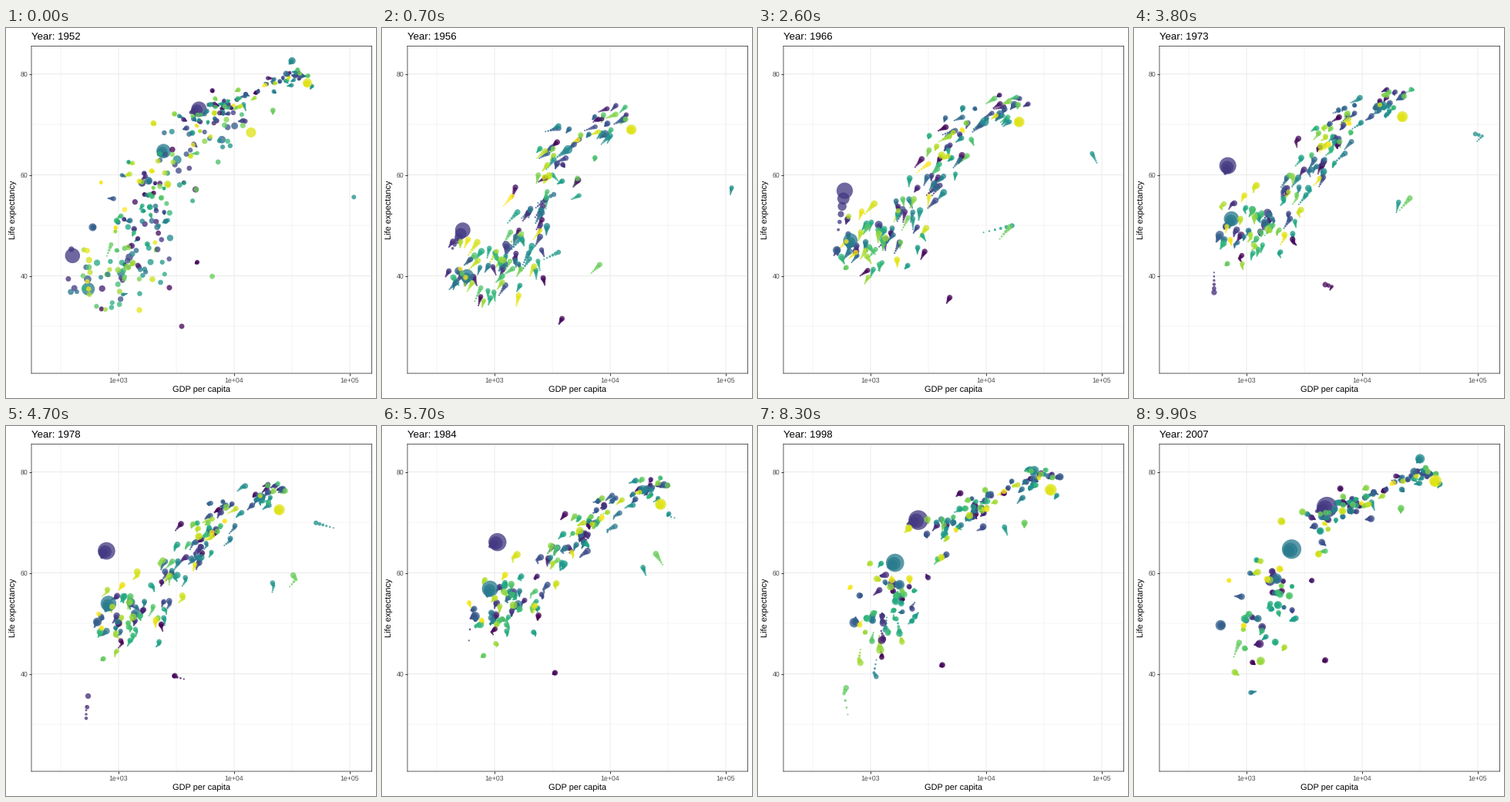
These frames come from a looping animation (480x480 px, 10000 ms). A matplotlib script:

```python
import numpy as np
import matplotlib.pyplot as plt
from matplotlib.animation import FuncAnimation

plt.rcParams["font.family"] = "Liberation Sans"
plt.rcParams["text.hinting"] = "none"

FRAMES, WAKE, COUNT = 100, 6, 142
YEARS = np.linspace(1952, 2007, FRAMES)
KNOTS = np.arange(1952, 2008, 5)
rng = np.random.default_rng(11)

pos = np.zeros((FRAMES, COUNT, 2))   # log10 GDP, life expectancy
pop = np.zeros((FRAMES, COUNT))      # millions
free = list(rng.permutation(COUNT))  # colour ranks not yet taken


def grow(start, end):
    return start * (end / start) ** ((YEARS - 1952) / 55)


def smooth(t):
    t = np.clip(t, 0, 1)
    return t * t * (3 - 2 * t)


def track(rank, pop0, pop1, *corners):
    """Lead one dot through a few (year, gdp, life) corners."""
    year, gdp, life = np.array(corners, float).T
    pos[:, rank, 0] = np.interp(YEARS, year, np.log10(gdp))
    pos[:, rank, 1] = np.interp(YEARS, year, life)
    pop[:, rank] = grow(pop0, pop1)
    free.remove(rank)


def crowd(n, gdp, life, gdp_sd, life_sd, corr, growth, dip=0):
    """Scatter n dots round a rising regional path, bending every 5 years."""
    s = np.linspace(0, 1, len(KNOTS))
    rise = 1 - (1 - s) ** 1.6
    fall = smooth((KNOTS - 1987) / 15)
    for _ in range(n):
        i = free.pop()
        a, b, c, d = np.clip(rng.normal(size=4), -2, 2)
        zg = a + 0.6 * (b - a) * s
        zl = corr * zg + np.sqrt(1 - corr ** 2) * (c + 0.5 * (d - c) * s)
        x = gdp[0] + (gdp[1] - gdp[0]) * rise + zg * gdp_sd
        y = life[0] + (life[1] - life[0]) * rise
        y += zl * (life_sd[0] + (life_sd[1] - life_sd[0]) * s)
        y -= dip * rng.random() ** 2 * fall
        x += rng.normal(0, 0.035, len(s))
        y += rng.normal(0, 0.3, len(s))
        pos[:, i, 0] = np.interp(YEARS, KNOTS, x)
        pos[:, i, 1] = np.interp(YEARS, KNOTS, y)
        start = np.clip(rng.lognormal(1.4, 1.2), 0.1, 50)
        pop[:, i] = grow(start, start * growth)


# giants
track(24, 556, 1319, (1952, 400, 44), (1957, 576, 50.5), (1962, 488, 44.5),
      (1967, 613, 58.4), (1977, 741, 64), (1992, 1656, 68.7),
      (2007, 4959, 73))
track(58, 372, 1110, (1952, 547, 37.4), (1972, 724, 50.7),
      (1987, 977, 58.6), (2007, 2452, 64.7))
track(134, 158, 301, (1952, 13990, 68.4), (1972, 21806, 71.3),
      (2007, 42952, 78.2))
track(66, 86, 127, (1952, 3217, 63), (1972, 14779, 73.4),
      (2007, 31656, 82.6))

# paths that leave the crowd
track(71, 0.2, 2.5, (1952, 108382, 55.6), (1957, 113523, 58),
      (1967, 80895, 64.6), (1972, 109348, 67.7), (1982, 31354, 71.3),
      (2007, 47307, 77.6))
track(107, 2.5, 8.9, (1952, 493, 40), (1987, 848, 44), (1992, 737, 23.6),
      (1997, 590, 36.1), (2007, 863, 46.2))
track(18, 4.7, 14, (1952, 368, 39.4), (1967, 523, 45.4), (1977, 525, 31.2),
      (1982, 624, 51), (2007, 1714, 59.7))
track(109, 4, 27.6, (1952, 6460, 39.9), (1962, 11626, 45.9),
      (1977, 34168, 58.7), (1987, 21198, 66.3), (2007, 21655, 72.8))
track(75, 1, 6, (1952, 2388, 42.7), (1962, 6757, 47.8), (1967, 18773, 50.2),
      (1977, 21951, 57.4), (2007, 12057, 74))
track(3, 4.2, 12.4, (1952, 3521, 30), (1972, 5473, 37.9),
      (1977, 3009, 39.5), (2007, 4797, 42.7))

# everyone else: Africa, Latin America, West, East, Asia, fast growers
crowd(48, (2.96, 3.15), (39.5, 57.5), 0.26, (4, 5), 0.3, 3.5, dip=17)
crowd(25, (3.45, 3.88), (53, 73.3), 0.2, (7.5, 3), 0.6, 2.6)
crowd(19, (3.88, 4.48), (68.5, 79.5), 0.11, (2.5, 1), 0.4, 1.3)
crowd(14, (3.55, 4.05), (63, 74), 0.17, (4, 1.6), 0.5, 1.3)
crowd(18, (3.05, 3.6), (43, 70), 0.27, (5.5, 4.5), 0.3, 3)
crowd(len(free), (3.35, 4.4), (57, 78), 0.2, (6, 1.8), 0.5, 2.6)

size = 2 + 10 * np.sqrt(np.clip(pop / 1319, 0, 1))

# plot frame, 72 dpi so that one point is one pixel
fig = plt.figure(figsize=(480 / 72, 480 / 72), dpi=72, facecolor="white")
ax = fig.add_axes([33 / 480, 32 / 480, 441.5 / 480, 424.5 / 480])
ax.set(xlim=(2.2467, 5.19), ylim=(20.69, 85.5))
ax.set_axisbelow(True)
ax.set_xticks([3, 4, 5], ["1e+03", "1e+04", "1e+05"])
ax.set_xticks([2.5, 3.5, 4.5], minor=True)
ax.set_yticks([40, 60, 80])
ax.set_yticks([30, 50, 70], minor=True)
ax.grid(which="major", color="#ebebeb", lw=1.07, snap=False)
ax.grid(which="minor", color="#ebebeb", lw=0.53, snap=False)
ax.tick_params(which="minor", length=0)
ax.tick_params(length=2.75, width=1, pad=2.2, color="#333333",
               labelcolor="#4d4d4d", labelsize=8.8)
for spine in ax.spines.values():
    spine.set(color="#333333", linewidth=0.8, snap=False)
fig.text(254 / 480, 7 / 480, "GDP per capita", size=11, ha="center",
         va="baseline")
fig.text(15.5 / 480, 244 / 480, "Life expectancy", size=11, rotation=90,
         ha="right", va="center")
title = fig.text(33 / 480, 465 / 480, "", size=13.2, va="baseline")

ages = np.arange(WAKE)[::-1]
falloff = (1 - ages / 10) ** 3
colors = plt.get_cmap("viridis")(np.linspace(0, 1, COUNT))
n = WAKE * COUNT
dots = ax.scatter(np.full(n, 3.0), np.full(n, 50.0), s=np.ones(n),
                  c=np.tile(colors, (WAKE, 1)), alpha=0.77, linewidths=0,
                  zorder=3)


def update(frame):
    past = (frame - ages) % FRAMES
    diameter = 0.75 * (size[past] * falloff[:, None] * 2.845 + 0.945) + 0.7
    dots.set_offsets(pos[past].reshape(-1, 2))
    dots.set_sizes(diameter.ravel() ** 2)
    title.set_text(f"Year: {round(YEARS[frame])}")
    return dots, title


anim = FuncAnimation(fig, update, frames=FRAMES, interval=100, repeat=True)
plt.show()
```
